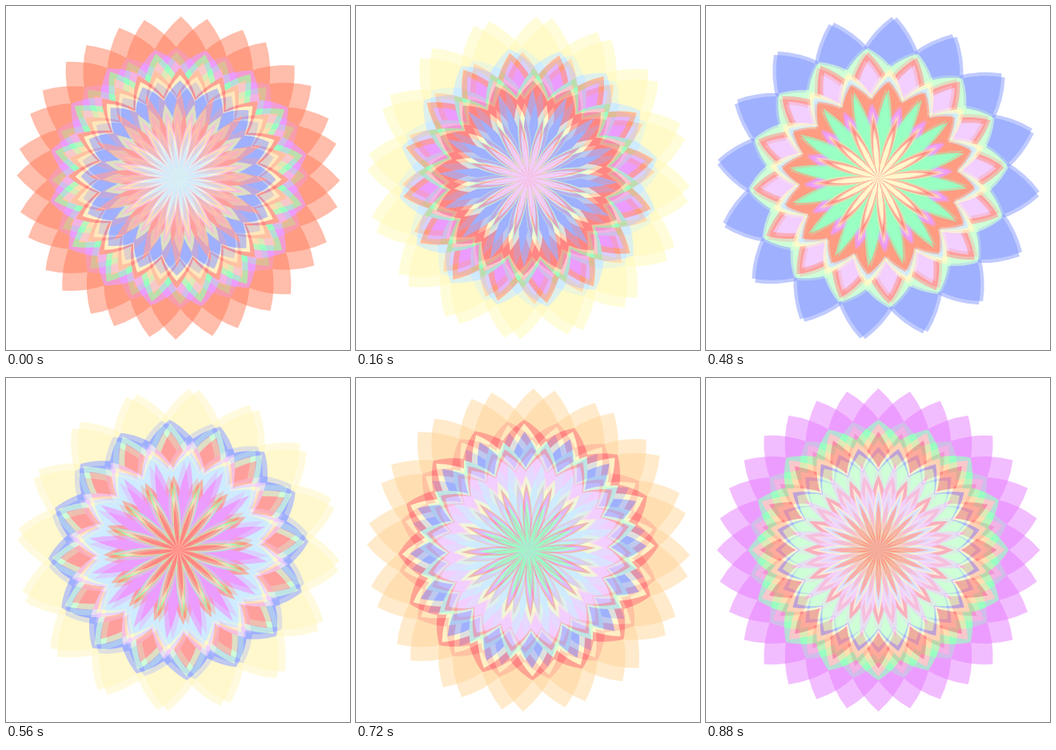
Animation, 430 px wide and 430 px high, one loop 960 ms. Source, as an HTML page:

```html
<!DOCTYPE html>
<html lang="en">
<head>
<meta charset="utf-8">
<title>Folding flower</title>
<style>
  html, body { margin: 0; width: 100%; height: 100%; overflow: hidden; background: #fff; }
  svg { display: block; width: 430px; height: 430px; }
</style>
</head>
<body>
<svg viewBox="-215.5 -215 430 430"></svg>
<script>
const STEP_MS = 80, PETALS = 16, PITCH = 360 / PETALS;

// One colour enters at the rim per step, then moves inwards ring by ring.
const COLORS = ['#ff7d5a', '#bfe6ff', '#fffab6', '#efc0ff', '#ff807d', '#bfffcb',
                '#8097ff', '#fff7be', '#ff5f5c', '#ffd699', '#79ffaf', '#e77dff'];

// Rings from the back: tip radius, opening angle at the centre, half-pitch turn.
const RINGS = [
  [202, 49, 0], [163, 58, 1], [158, 42, 1], [148, 36, 1],
  [138, 40, 0], [129, 43, 0], [122, 48, 0], [94, 25, 1],
  [112, 18, 0], [84, 15, 1], [76, 13, 1], [63, 12, 1]
];

const svg = document.querySelector('svg');

function add(parent, tag, attrs) {
  const node = document.createElementNS(svg.namespaceURI, tag);
  for (const key in attrs) node.setAttribute(key, attrs[key]);
  return parent.appendChild(node);
}

// Lens-shaped petals, each made of two arcs between centre and tip.
function flowerPath([tip, opening, turned]) {
  const radius = tip / (2 * Math.sin(opening * Math.PI / 180));
  const arc = `A${radius} ${radius} 0 0 1 `;
  let path = '';
  for (let i = 0; i < PETALS; i++) {
    const angle = (i + turned / 2) * PITCH * Math.PI / 180;
    path += `M0 0${arc}${tip * Math.sin(angle)} ${-tip * Math.cos(angle)}${arc}0 0Z`;
  }
  return path;
}

const paths = RINGS.map(flowerPath);
const layers = [-1, 1].map(direction => {
  const group = add(svg, 'g', { opacity: 0.5 });
  return { group, direction, rings: paths.map(d => add(group, 'path', { d })) };
});

function draw(now) {
  const count = COLORS.length;
  const step = Math.floor(now / STEP_MS) % count;
  const turn = (step + 1) / count * PITCH / 2;
  for (const { group, direction, rings } of layers) {
    group.setAttribute('transform', `rotate(${direction > 0 ? turn : PITCH / 2 - turn})`);
    rings.forEach((ring, k) => ring.setAttribute('fill', COLORS[(step - k + count) % count]));
  }
}

const start = performance.now();
function tick() {
  draw(performance.now() - start);
  requestAnimationFrame(tick);
}
tick();
</script>
</body>
</html>
```
